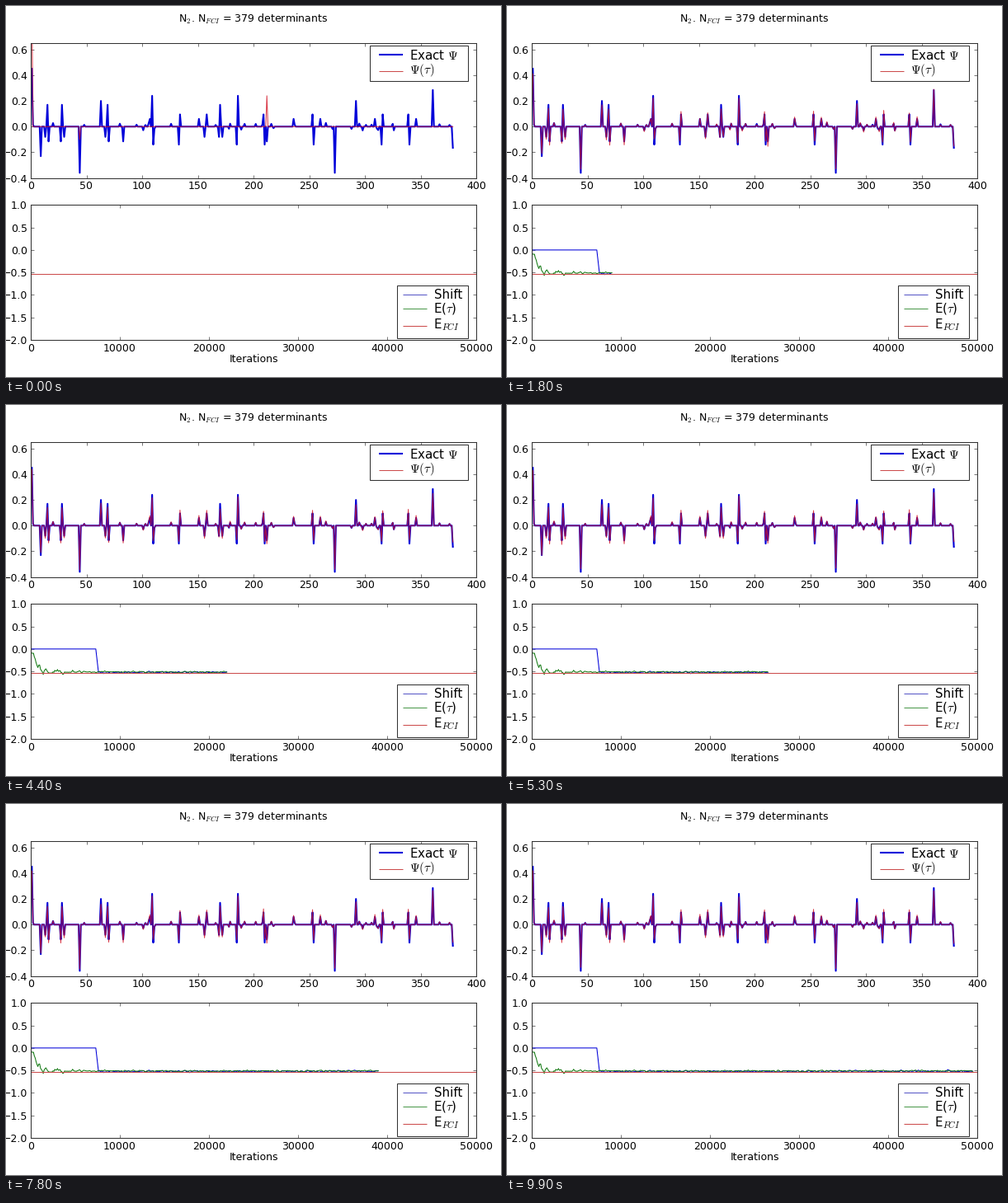
Recreate the animation shown at these times as a matplotlib script. Size 600 by 450 pixels, loop 10000 ms.

```python
import numpy as np
import matplotlib.pyplot as plt
from matplotlib.animation import FuncAnimation
from matplotlib.patches import Rectangle

plt.rcParams.update({
    "font.family": "DejaVu Sans", "font.size": 12, "mathtext.fontset": "cm",
    "axes.linewidth": 1.0, "axes.edgecolor": "0.2",
    "xtick.direction": "in", "ytick.direction": "in",
    "xtick.top": True, "ytick.right": True,
    "xtick.major.size": 4, "ytick.major.size": 4,
    "xtick.major.width": 0.5, "ytick.major.width": 0.5,
    "xtick.major.pad": 3.5, "ytick.major.pad": 4,
})

W, H, DPI = 600, 450, 75
FRAMES, STEP = 100, 500
N_DET = 379
E_FCI, E_MEAN = -0.542, -0.51
SHIFT_ON, SHIFT_SET = 7300, 7600

BLUE, GREEN = (0, 0, 0.85), (0.08, 0.48, 0.08)
RED = (0.82, 0.05, 0.12)
PALE_BLUE, PALE_GREEN, PALE_RED = (0.35, 0.35, 0.78), (0.3, 0.6, 0.3), (0.8, 0.3, 0.3)

rng = np.random.default_rng(7)

# Equivalent determinants share one amplitude
LEVELS = {
    0.45: [1], 0.285: [361], -0.23: [9], -0.165: [379],
    -0.36: [44, 273], 0.24: [109, 186], 0.20: [63, 292],
    0.17: [15, 28, 69, 170],
    -0.14: [110, 133, 185, 210, 254, 315, 340],
    -0.115: [16, 27, 70, 83, 212],
    0.095: [134, 158, 209, 253, 316, 339],
    -0.08: [13, 30, 67, 156, 169, 172],
    0.06: [107, 151, 236, 260, 309, 346],
}

det = np.arange(1, N_DET + 1)
exact = np.zeros(N_DET)
ripples = rng.choice(N_DET, 36, replace=False)
exact[ripples] = rng.choice([-1, 1], 36) * rng.uniform(0.01, 0.03, 36)
for amp, sites in LEVELS.items():
    exact[np.array(sites) - 1] = amp

# The walkers reproduce large peaks well and overshoot small ones
size = np.abs(exact)
limit = exact * np.select([size > 0.22, size > 0.13], [0.94, 0.83], 1.22)

start = np.zeros(N_DET)
start[[0, 43, 211]] = 0.95, -0.10, 0.24

# Sampling noise that drifts slowly from frame to frame
noise = np.zeros((FRAMES, N_DET))
for i in range(1, FRAMES):
    noise[i] = 0.8 * noise[i - 1] + 0.6 * rng.standard_normal(N_DET)


def sampled(i):
    t = i * STEP
    left = np.exp(-t / 1200)
    spread = 0.16 * np.exp(-t / 1800) + 0.04 * np.exp(-t / 9000) + 0.012
    return start * left + limit * (1 - left) + spread * np.sqrt(size) * noise[i]


# Energy traces
its = np.arange(0, FRAMES * STEP + 1, 100)
jitter = rng.standard_normal((2, its.size))
jitter[:, 1:] = 0.5 * jitter[:, :-1] + 0.85 * jitter[:, 1:]
energy = E_MEAN + 0.4 * np.exp(-(its / 900) ** 2)
energy += jitter[0] * (0.06 * np.exp(-its / 2500) + 0.008)
ramp = np.clip((its - SHIFT_ON) / (SHIFT_SET - SHIFT_ON), 0, 1)
shift = (E_MEAN - 0.01) * ramp + 0.011 * jitter[1] * (its > SHIFT_SET)

# Panels
fig, (top, low) = plt.subplots(2, 1, figsize=(W / DPI, H / DPI), dpi=DPI,
                               facecolor="white")
fig.subplots_adjust(left=0.05, right=0.95, bottom=0.1, top=0.9, hspace=0.2)

top.set(xlim=(0, 400), ylim=(-0.4, 0.65), xticks=range(0, 401, 50),
        yticks=np.arange(-2, 4) * 0.2)
top.yaxis.set_major_formatter("{x:.1f}")
low.set(xlim=(0, 50000), ylim=(-2, 1), xticks=range(0, 50001, 10000),
        yticks=np.arange(-4, 3) * 0.5)
for ax in (top, low):
    ax.yaxis.set_major_formatter(
        lambda v, pos: f"{abs(v):.1f}" if v > -0.01 else f"\u2212{-v:.1f}")

top.plot(det, exact, color=BLUE, lw=2)
walk, = top.plot([], [], color=RED, lw=1, alpha=0.8)
shift_line, = low.plot([], [], color=BLUE, lw=1)
energy_line, = low.plot([], [], color=GREEN, lw=1)
low.axhline(E_FCI, color=PALE_RED, lw=1)

# Title, axis label and legends in pixel coordinates
over = fig.add_axes([0, 0, 1, 1], zorder=5)
over.set(xlim=(0, W), ylim=(H, 0))
over.axis("off")


def label(x, y, s, size=12, ha="left"):
    over.text(x, y, s, fontsize=size, ha=ha, va="baseline")


def legend(x0, y0, x1, y1, pad, rows):
    over.add_patch(Rectangle((x0, y0), x1 - x0, y1 - y0, fc="white", ec="0.2", lw=1))
    for y, base, color, lw, text in rows:
        over.plot([x0 + pad, x0 + pad + 29], [y, y], color=color, lw=lw,
                  solid_capstyle="butt")
        label(x0 + pad + 37.5, base, text, 14.4)


label(300, 20, "N$_2$. N$_{FCI}$ = 379 determinants", ha="center")
label(300, 432.5, "Iterations", ha="center")
legend(440.5, 47.5, 559.5, 91, 11, [
    (59, 65, BLUE, 2, r"Exact $\Psi$"),
    (78.5, 82.5, PALE_RED, 1, r"$\Psi(\tau)$"),
])
legend(473.5, 338.5, 560, 402.5, 7.5, [
    (350, 355, PALE_BLUE, 1, "Shift"),
    (366.5, 371.5, PALE_GREEN, 1, r"E($\tau$)"),
    (387.5, 391.5, PALE_RED, 1, "E$_{FCI}$"),
])


def update(i):
    walk.set_data(det, sampled(i))
    n = i * STEP // 100 + 1 if i else 0
    shift_line.set_data(its[:n], shift[:n])
    energy_line.set_data(its[:n], energy[:n])
    return walk, shift_line, energy_line


anim = FuncAnimation(fig, update, frames=FRAMES, interval=100, repeat=True,
                     repeat_delay=0, blit=False)
plt.show()
```
